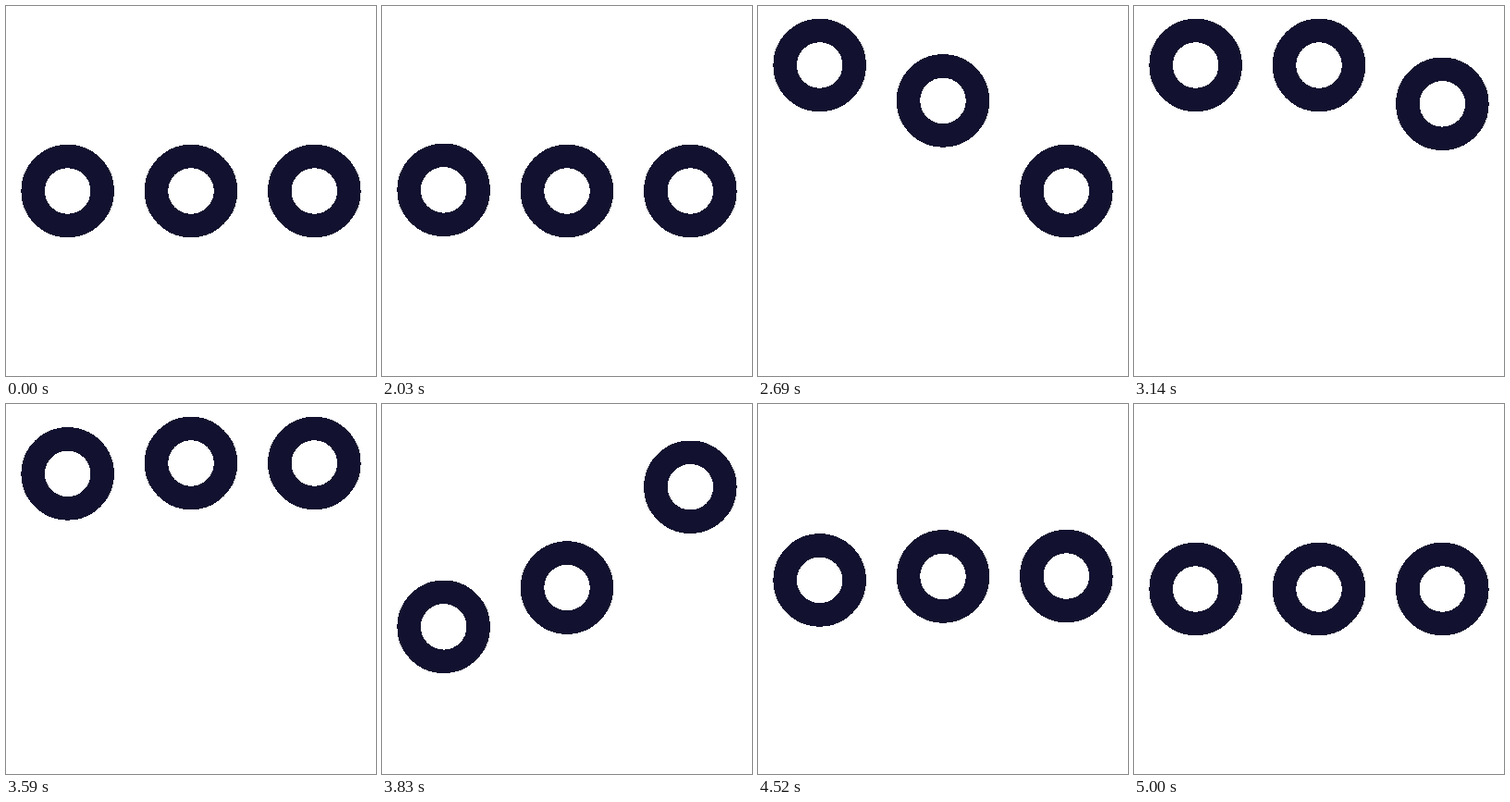
Animation of 400x400 px, one loop 5.03 s. Source, as an HTML page:

```html
<!DOCTYPE html>
<html lang="en">
<head>
<meta charset="utf-8">
<title>Three rings</title>
<style>
  html, body { margin: 0; width: 100%; height: 100%; overflow: hidden; background: #fff; }
  svg { display: block; width: 100vw; height: 100vh; }
  circle { fill: none; stroke: #121230; stroke-width: 25.5; shape-rendering: crispEdges; }
</style>
</head>
<body>
<svg viewBox="0 0 400 400">
  <circle cx="66.67" cy="200" r="37.5"/>
  <circle cx="200" cy="200" r="37.5"/>
  <circle cx="333.33" cy="200" r="37.5"/>
</svg>
<script>
  const LOOP = 5030, TICK = 30, HOLD = 2030;
  const REST = 200, TOP = 64, LOW = 242, HIGH = 186;
  const rings = [...document.querySelectorAll('circle')];

  const cubicInOut = u => u < 0.5 ? 4 * u ** 3 : 1 - 4 * (1 - u) ** 3;

  // cubic-bezier(0.4, 0, 0.2, 1), solved by bisection
  function swift(u) {
    let lo = 0, hi = 1, b = 0.5;
    for (let i = 0; i < 24; i++) {
      b = (lo + hi) / 2;
      const a = 1 - b;
      const x = 1.2 * a * a * b + 0.6 * a * b * b + b ** 3;
      if (x < u) lo = b; else hi = b;
    }
    return b * b * (3 - 2 * b);
  }

  // The rises follow one another; the falls overlap closely.
  function moves(i) {
    const rise = 2000 + 458 * i, fall = 3494 + 105 * i;
    return [
      { at: rise, time: 506, to: TOP, ease: swift },
      { at: fall, time: 381, to: LOW, ease: cubicInOut },
      { at: fall + 381, time: 450, to: HIGH, ease: swift },
      { at: fall + 831, time: 455, to: REST, ease: cubicInOut }
    ];
  }
  const paths = rings.map((_, i) => moves(i));

  function heightAt(path, t) {
    let y = REST;
    for (const { at, time, to, ease } of path) {
      if (t <= at) break;
      y += (to - y) * ease(Math.min(1, (t - at) / time));
    }
    return y;
  }

  const start = performance.now();
  function draw() {
    const t = Math.max(0, performance.now() - start) % LOOP;
    // Poses advance in even ticks after the opening pause.
    const pose = t < HOLD ? 0 : HOLD + Math.floor((t - HOLD) / TICK) * TICK;
    rings.forEach((ring, i) => ring.setAttribute('cy', heightAt(paths[i], pose).toFixed(2)));
    requestAnimationFrame(draw);
  }
  draw();
</script>
</body>
</html>
```
